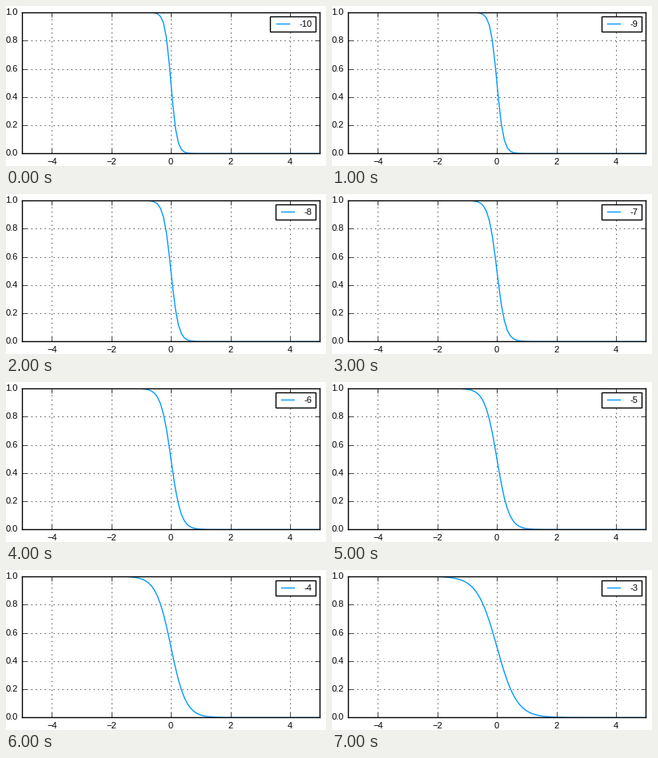
Write a matplotlib script that moves like this. It is 400 px wide and 200 px high and loops after 8 s.

```python
import numpy as np
import matplotlib.pyplot as plt
from matplotlib.animation import FuncAnimation

WIDTH, HEIGHT, DPI = 400, 200, 100
MARGIN = 2 / 25.4 * DPI  # 2 mm at the top and right
LEFT, RIGHT, TOP, BOTTOM = 20.2, WIDTH - MARGIN, MARGIN, 184.48
SLOPES = range(-10, -2)

plt.style.use("classic")
plt.rcParams.update({
    "font.family": "Liberation Sans",
    "font.size": 8,
    "xtick.labelsize": 8,
    "ytick.labelsize": 8,
    "legend.fontsize": 8,
    "figure.facecolor": "white",
    "savefig.facecolor": "white",
    "savefig.dpi": DPI,
})

fig = plt.figure(figsize=(WIDTH / DPI, HEIGHT / DPI), dpi=DPI)
ax = fig.add_axes([LEFT / WIDTH, 1 - BOTTOM / HEIGHT,
                   (RIGHT - LEFT) / WIDTH, (BOTTOM - TOP) / HEIGHT])
ax.set_xticks(np.arange(-4, 5, 2))
ax.set_yticks(np.linspace(0, 1, 6))
ax.set_xlim(-5, 5)
ax.set_ylim(0, 1)
ax.set_axisbelow(True)
ax.grid(True)

x = np.linspace(-5, 5, 100)
curve, = ax.plot([], [], color="#0099ff", lw=1)


def draw(i):
    """Show the logistic curve for the i-th slope."""
    slope = SLOPES[i]
    curve.set_data(x, 1 / (1 + np.exp(-slope * x)))
    curve.set_label(str(slope))
    legend = ax.legend(loc="upper right")
    return curve, legend


anim = FuncAnimation(fig, draw, frames=len(SLOPES), interval=1000,
                     repeat=True, repeat_delay=0, blit=False)
plt.show()
```
